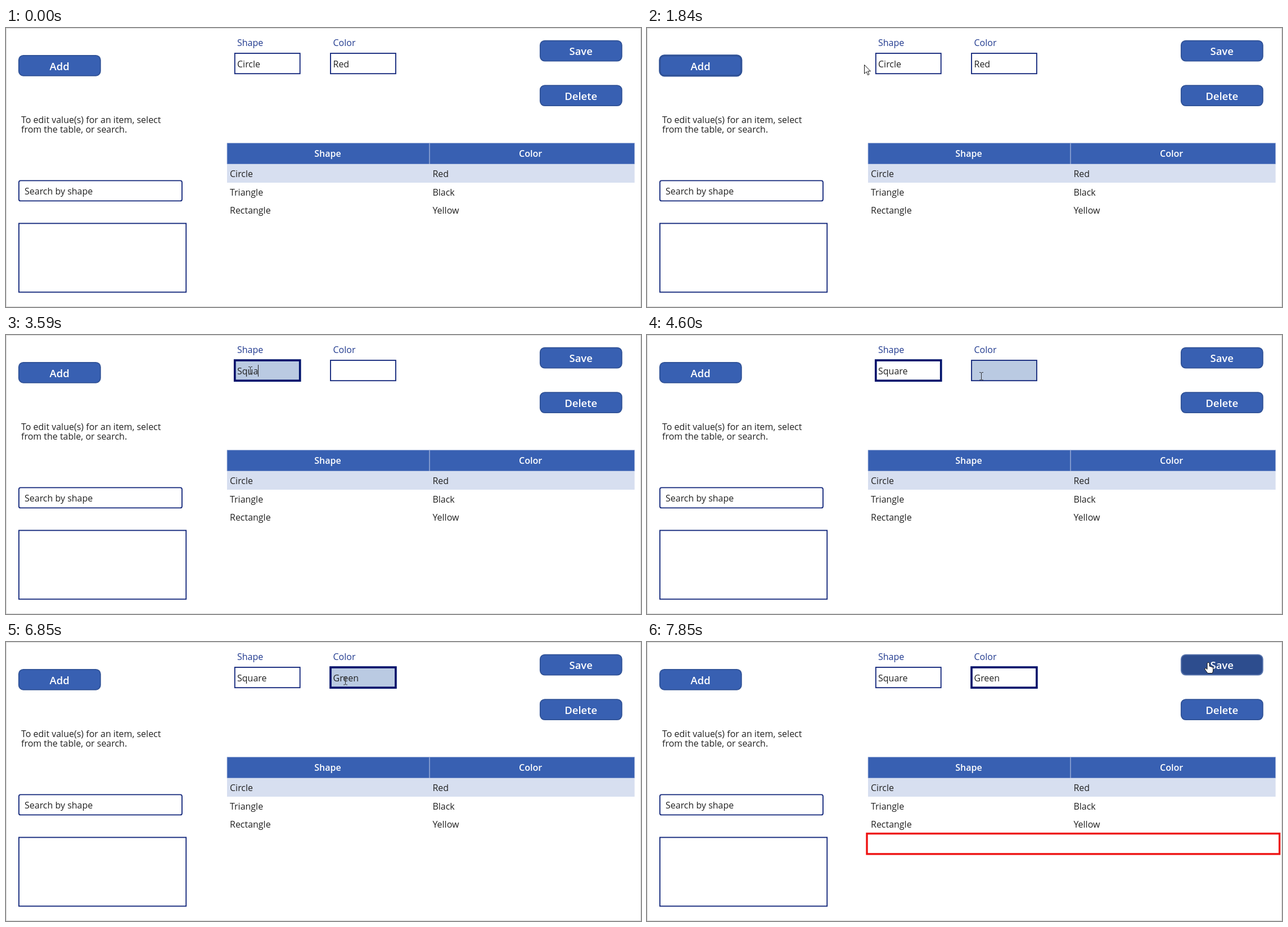
These frames come from a looping animation (1129 by 496 pixels, 8 s). An HTML page:

```html
<!DOCTYPE html>
<html lang="en">
<head>
<meta charset="utf-8">
<title>Add a record</title>
<style>
  html, body { margin: 0; width: 100%; height: 100%; overflow: hidden; background: #fff; }
  svg { display: block; }
  text { font: 16px "Open Sans", sans-serif; fill: #222; white-space: pre; }
  .button rect { fill: #3860b2; stroke: #305297; stroke-width: 1.85; }
  .button.hover rect { fill: #2d4d8e; stroke: #5975ac; }
  .button.focus rect { stroke-width: 3.2; }
  .button text { font-size: 18.46px; font-weight: 600; fill: #fff; text-anchor: middle; }
  .head { font-weight: 600; fill: #fff; text-anchor: middle; }
  .label { fill: #213a8f; }
  .box, .input rect { fill: #fff; stroke: #12267b; stroke-width: 1.85; }
  .input.hover rect { fill: #bacae2; }
  .input.focus rect { stroke: #00126b; stroke-width: 3.7; }
  #tip rect { fill: #fff; stroke: #666; }
  #tip text { font-size: 11px; fill: #575757; }
  #arrow, #hand { fill: #fff; stroke: #111; stroke-width: 1; stroke-linejoin: round; }
  #beam { fill: none; stroke: #333; stroke-width: 1; }
</style>
</head>
<body>
<svg width="1129" height="496" viewBox="0 0 1129 496">
  <rect x=".5" y=".5" width="1128" height="495" fill="#fff" stroke="#d4d4d4"/>

  <g id="add" class="button"><rect x="22.8" y="48.8" width="145" height="36" rx="8"/><text x="95.2" y="74.5">Add</text></g>
  <g id="save" class="button"><rect x="949.8" y="22.6" width="145" height="36" rx="8"/><text x="1022.2" y="47.5">Save</text></g>
  <g class="button"><rect x="949.8" y="102.1" width="145" height="36" rx="8"/><text x="1022.2" y="127.5">Delete</text></g>

  <text x="27" y="168.5">To edit value(s) for an item, select</text>
  <text x="27" y="186">from the table, or search.</text>
  <rect class="box" x="22.9" y="271.4" width="290" height="36" rx="3"/>
  <text x="33" y="296">Search by shape</text>
  <rect class="box" x="22.9" y="347.4" width="297.3" height="122.2"/>

  <text class="label" x="411" y="31.5">Shape</text>
  <text class="label" x="581.5" y="31.5">Color</text>
  <g id="shape" class="input"><rect x="406.8" y="45" width="115.9" height="36.2"/><text x="411" y="69.7"></text></g>
  <g id="color" class="input"><rect x="577" y="45" width="115.9" height="36.2"/><text x="581.5" y="69.7"></text></g>

  <path fill="#3860b2" stroke="#a9b8dc" stroke-width=".8" d="M393 204.6H753V242H393ZM753 204.6H1117.6V242H753Z"/>
  <path fill="#d7dff0" d="M393 242.4H1117.6V275H393Z"/>
  <text class="head" x="572" y="229">Shape</text>
  <text class="head" x="932.6" y="229">Color</text>
  <g id="rows"></g>
  <rect id="highlight" x="391" y="340.6" width="733.6" height="36.3" fill="none" stroke="#ee1111" stroke-width="3.4"/>

  <path id="caret" d="M.5 53V74" stroke="#222"/>
  <g id="tip"><rect x="8.5" y="13.5" height="22"/><text x="15" y="28.5"></text></g>
  <g id="cursor">
    <path id="arrow" d="M.5.5V16.2L4.1 12.8L6.6 18.6L9 17.5L6.5 11.8H11.4Z"/>
    <path id="hand" d="M-2 1.5Q0-1 2 1.5V7L7 8.4Q8.6 9 8.6 11.5V14Q8.6 17 7 19.5H-1L-6 13Q-7 10.4-4.5 10.5L-2 12.5Z"/>
    <path id="beam" d="M-3-6.5H-1L.5-5.5L2-6.5H4M.5-5.5V6M-3 7H-1L.5 6L2 7H4"/>
  </g>
</svg>
<script>
const LOOP = 8000, STEP = 77;
const $ = id => document.getElementById(id);
const between = (t, from, to) => t >= from && t < to;
const show = (el, on) => el.setAttribute('visibility', on ? 'visible' : 'hidden');
const move = (el, x, y) => el.setAttribute('transform', `translate(${x} ${y})`);

[['Circle', 'Red'], ['Triangle', 'Black'], ['Rectangle', 'Yellow']].forEach((row, i) =>
  row.forEach((word, col) => {
    const cell = document.createElementNS('http://www.w3.org/2000/svg', 'text');
    cell.setAttribute('x', 398 + col * 360.4);
    cell.setAttribute('y', 265 + i * 32.7);
    cell.textContent = word;
    $('rows').append(cell);
  }));

// Each pointer trip: start time and the stops it makes, one per STEP.
const trips = [
  [370, [[820, 424], [714, 384], [597, 336], [482, 288], [374, 233], [304, 186],
         [222, 133], [190, 107], [158, 86], [142, 75], [137, 72]]],
  [1530, [[160, 73], [222, 71], [290, 68], [350, 66], [386, 65], [412, 64], [428, 63], [434, 63]]],
  [4360, [[450, 72], [496, 86], [550, 90], [594, 73], [603, 69]]],
  [7080, [[610, 68], [650, 63], [730, 55], [830, 47], [910, 41], [965, 38], [990, 36], [998, 36]]]
];

const inputs = [
  { el: $('shape'), before: 'Circle', after: 'Square', name: 'Shape',
    keys: [3040, 3270, 3440, 3590, 3820, 3900], focus: [2240, 4910], tip: [2640, 3120] },
  { el: $('color'), before: 'Red', after: 'Green', name: 'Color',
    keys: [5530, 5840, 5990, 6070, 6310], focus: [4910, LOOP], tip: [5230, 5610] }
];
const caretOff = [[2890, 3040], [4440, 4910], [5460, 5530], [6850, 7390], [7850, LOOP]];

function pointerAt(t) {
  const trip = trips.filter(([start]) => t >= start).pop();
  if (!trip) return null;
  const [start, stops] = trip;
  return stops[Math.min(stops.length - 1, Math.floor((t - start + 5) / STEP))];
}

function isOver(el, point) {
  if (!point) return false;
  const { x, y, width, height } = el.querySelector('rect').getBBox();
  return between(point[0], x, x + width) && between(point[1], y, y + height);
}

function drawInput(input, t, point) {
  const { el, before, after, keys, focus, tip, name } = input;
  const text = el.querySelector('text');
  const focused = between(t, ...focus);
  const hovered = isOver(el, point);
  text.textContent = t < 1990 ? before : after.slice(0, keys.filter(k => t >= k).length);
  el.classList.toggle('hover', hovered);
  el.classList.toggle('focus', focused);
  if (focused) {
    const width = text.textContent ? text.getComputedTextLength() : 0;
    move($('caret'), Math.round(+text.getAttribute('x') + width - .5), 0);
  }
  if (between(t, ...tip)) {
    const label = $('tip').querySelector('text');
    label.textContent = name;
    $('tip').querySelector('rect').setAttribute('width', Math.round(label.getComputedTextLength() + 13));
    move($('tip'), ...point);
    show($('tip'), true);
  }
  return hovered;
}

function draw(t) {
  const point = pointerAt(t);
  show($('tip'), false);
  const overInput = inputs.map(input => drawInput(input, t, point)).includes(true);
  show($('caret'), t >= 2240 && !caretOff.some(span => between(t, ...span)));

  const overAdd = isOver($('add'), point), overSave = isOver($('save'), point);
  $('add').classList.toggle('hover', overAdd && !between(t, 1300, 1380));
  $('add').classList.toggle('focus', between(t, 1300, 2240));
  $('save').classList.toggle('hover', overSave);
  show($('highlight'), t >= 7460);

  const overButton = overAdd || overSave;
  show($('hand'), point && overButton);
  show($('beam'), point && overInput);
  show($('arrow'), point && !overButton && !overInput);
  if (point) move($('cursor'), ...point);
}

const begin = performance.now();
function tick() {
  draw((performance.now() - begin) % LOOP);
  requestAnimationFrame(tick);
}
tick();
</script>
</body>
</html>
```
